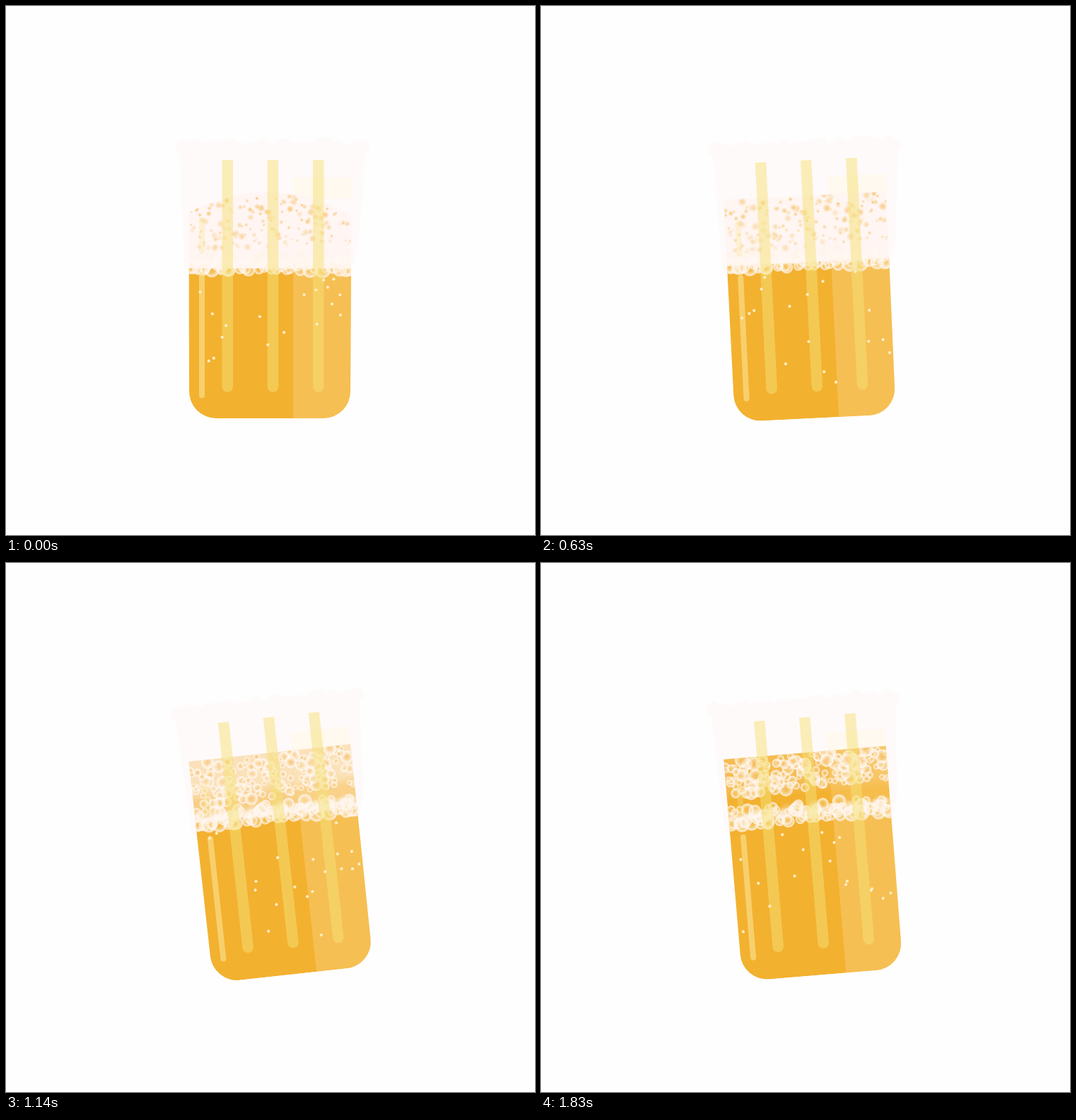
These frames come from a looping animation (748 px wide and 748 px high, 1.86 s). An HTML page with a canvas:

```html
<!DOCTYPE html>
<html lang="en">
<head>
<meta charset="utf-8">
<title>Beer glass</title>
<style>
html, body { margin: 0; width: 100%; height: 100%; overflow: hidden; background: #fefefe; }
canvas { display: block; width: 748px; height: 748px; }
</style>
</head>
<body>
<canvas id="stage" width="748" height="748"></canvas>
<script>
const ctx = document.getElementById('stage').getContext('2d');
const LOOP = 1860, STEP = 30, RISE = 0.113;
const PIVOT = [376, 275];
const LEFT = 259, RIGHT = 488, FOAM_TOP = 268, BOTTOM = 583;
const BEER = [243, 177, 48], FROTH = [255, 245, 243];

// key poses of the sway: time in ms, tilt in degrees
const TILT = [[0, 0], [130, 2], [390, -1.4], [530, -3.7], [630, -2.8], [870, 0], [1140, -6.2],
  [1230, -6.8], [1410, -4.3], [1530, 1], [1730, -6.8], [1830, -4.75]];

function seeded(seed) {
  return () => {
    seed = (seed * 1664525 + 1013904223) >>> 0;
    return seed / 4294967296;
  };
}
const rand = seeded(77);
const range = (a, b) => a + (b - a) * rand();
const make = (n, build) => Array.from({ length: n }, (_, i) => build(i, n));
const clamp = v => Math.max(0, Math.min(1, v));
const mix = (a, b, k) => a + (b - a) * k;
const ease = (a, b, t) => { const k = clamp((t - a) / (b - a)); return k * k * (3 - 2 * k); };
const blend = (a, b, k) => `rgb(${a.map((v, i) => Math.round(mix(v, b[i], k)))})`;

// evenly spread x with jitter; stride shuffles the stacking order
const spread = (i, n, stride = 1) => mix(LEFT, RIGHT, (i * stride % n + rand()) / n);
const foam = (n, stride, small, big) => make(n, i => ({
  x: spread(i, n, stride), v: rand(), r: mix(small, big, rand() ** 1.5),
  tint: range(.3, .85), phase: range(0, 6.3)
}));
const topFoam = foam(150, 37, 4, 10.5);
const lowFoam = foam(62, 23, 5, 11);
const hanging = foam(14, 1, 7, 13);
const puffs = foam(36, 5, 6, 13);
const fringe = make(30, (i, n) => ({ x: mix(250, 504, i / (n - 1)), y: range(196, 202), r: range(5, 11), phase: range(0, 6.3) }));
const fizz = make(48, (i, n) => ({ x: range(LEFT + 3, RIGHT - 3), y: range(460, 540), born: mix(-1150, LOOP - 50, i / n) }));

function tiltAt(t) {
  const last = TILT.length - 1;
  let i = 0;
  while (i < last - 1 && t > TILT[i + 1][0]) i++;
  const slope = j => {
    const a = TILT[Math.max(0, j - 1)], b = TILT[Math.min(last, j + 1)];
    return (b[1] - a[1]) / (b[0] - a[0]);
  };
  const [t0, a] = TILT[i], [t1, b] = TILT[i + 1], d = t1 - t0, k = (t - t0) / d;
  const k2 = k * k, k3 = k2 * k;
  return (2 * k3 - 3 * k2 + 1) * a + (k3 - 2 * k2 + k) * d * slope(i)
    + (3 * k2 - 2 * k3) * b + (k3 - k2) * d * slope(i + 1);
}

function disc(x, y, r, fill) {
  ctx.fillStyle = fill;
  ctx.beginPath();
  ctx.arc(x, y, r, 0, 7);
  ctx.fill();
}

function glow(x, y, r, ...stops) {
  const g = ctx.createRadialGradient(x, y, 0, x, y, r);
  stops.forEach(([at, color]) => g.addColorStop(at, color));
  disc(x, y, r, g);
}

function bubble(x, y, r) {
  glow(x, y, r, [0, 'rgba(255,238,215,.08)'], [.4, 'rgba(255,240,222,.25)'],
    [.78, 'rgba(255,246,238,.72)'], [.92, 'rgba(255,247,242,.75)'], [1, 'rgba(255,247,242,.25)']);
}

function pill(x, y, w, h, radii, fill) {
  ctx.fillStyle = fill;
  ctx.beginPath();
  ctx.roundRect(x, y, w, h, radii);
  ctx.fill();
}

function drawHalo(t) {
  ctx.fillStyle = '#fffafa';
  ctx.beginPath();
  [[246, 200], [509, 200], [498, 342], [488, 372], [252, 372]].forEach(p => ctx.lineTo(...p));
  ctx.fill();
  fringe.forEach(f => disc(f.x, f.y + 2 * Math.sin(t / 170 + f.phase), f.r, '#fffafa'));
  ctx.fillStyle = 'rgba(255,240,180,.16)';
  ctx.fillRect(406, 243, 83, 30);
}

// Glass interior; the dome flattens soon after the start.
function clipBody(t) {
  const flat = ease(0, 300, t);
  ctx.beginPath();
  ctx.moveTo(258.5, mix(292, FOAM_TOP, flat));
  ctx.quadraticCurveTo(377, mix(231, FOAM_TOP, flat), 488.5, mix(298, FOAM_TOP, flat));
  ctx.lineTo(487, BOTTOM - 38);
  ctx.arcTo(487, BOTTOM, 449, BOTTOM, 38);
  ctx.lineTo(297, BOTTOM);
  ctx.arcTo(259, BOTTOM, 259, BOTTOM - 38, 38);
  ctx.closePath();
  ctx.clip();
}

function drawBeer(thin, gap, floor) {
  ctx.fillStyle = blend(BEER, BEER, 0);
  ctx.fillRect(250, floor, 250, BOTTOM - floor);

  // froth thins with time and a band of beer opens in it
  const base = ctx.createLinearGradient(0, FOAM_TOP, 0, floor);
  const solid = 1 - thin, open = solid * (1 - gap);
  [[0, solid], [.5, solid], [.68, open], [.84, open], [1, solid]]
    .forEach(([at, k]) => base.addColorStop(at, blend(BEER, FROTH, k)));
  ctx.fillStyle = base;
  ctx.fillRect(250, 240, 250, floor - 239);

  ctx.fillStyle = 'rgba(255,233,180,.26)';
  ctx.fillRect(406, floor, 94, BOTTOM - floor);
  ctx.globalAlpha = thin;
  ctx.fillRect(406, 240, 94, floor - 240);
  ctx.globalAlpha = 1;
}

function drawFoam(t, thin) {
  const age = t / LOOP;
  const sway = b => Math.sin(t / 210 + b.phase);

  const depth = mix(74, 50, ease(600, 1750, t));
  const ring = mix(.25, 1, ease(0, 1100, t));
  topFoam.forEach(b => {
    const x = b.x + sway(b), y = 269 + b.v ** 1.2 * depth;
    const a = b.tint * (1 - .5 * b.v);
    glow(x, y, b.r * mix(.55, .8, age), [0, `rgba(243,180,75,${a})`],
      [.45, `rgba(245,186,88,${a * .8})`], [1, 'rgba(246,192,105,0)']);
    ctx.globalAlpha = ring;
    bubble(x, y, b.r * mix(.75, 1, age));
    ctx.globalAlpha = 1;
  });

  // lower band, opaque in its middle
  const line = mix(365, 353, ease(0, 1300, t));
  lowFoam.forEach(b => bubble(b.x + sway(b), line - 13 + b.v * 22, b.r));
  puffs.forEach(b => {
    const a = b.tint * mix(1, .85, thin);
    glow(b.x, line - 8 + b.v * 9, b.r, [0, `rgba(255,249,246,${a})`],
      [.5, `rgba(255,248,244,${a * .75})`], [1, 'rgba(255,246,240,0)']);
  });
  hanging.forEach(b => {
    const slant = (374 - b.x) * .04 * thin;
    bubble(b.x + sway(b), line + 4 + b.v * 6 + slant, b.r);
  });
}

function drawFizz(t) {
  fizz.forEach(b => {
    const y = b.y - RISE * (t - b.born);
    if (t >= b.born && y > 370) disc(b.x, y, 2.1, '#fdedc4');
  });
}

function draw(t) {
  ctx.setTransform(1, 0, 0, 1, 0, 0);
  ctx.fillStyle = '#fefefe';
  ctx.fillRect(0, 0, 748, 748);
  ctx.translate(...PIVOT);
  ctx.rotate(tiltAt(t) * Math.PI / 180);
  ctx.translate(-PIVOT[0], -PIVOT[1]);

  const thin = .85 * ease(600, 1950, t);
  const gap = ease(800, 1600, t);
  const floor = Math.round(mix(370, 354, ease(0, 1200, t)));

  drawHalo(t);
  ctx.save();
  clipBody(t);
  drawBeer(thin, gap, floor);
  drawFoam(t, thin);
  ctx.restore();

  pill(273, 300, 8, 50, 4, 'rgba(250,228,140,.3)');
  pill(273, 376, 8, 178.5, 4, 'rgba(250,228,150,.6)');
  [305.5, 369.7, 434].forEach(x => pill(x, 218, 15.5, 328, [0, 0, 7.7, 7.7], 'rgba(246,226,118,.5)'));
  drawFizz(t);
}

const start = performance.now();
function tick() {
  const t = (performance.now() - start) % LOOP;
  draw(Math.floor(t / STEP) * STEP);
  requestAnimationFrame(tick);
}
tick();
</script>
</body>
</html>
```
